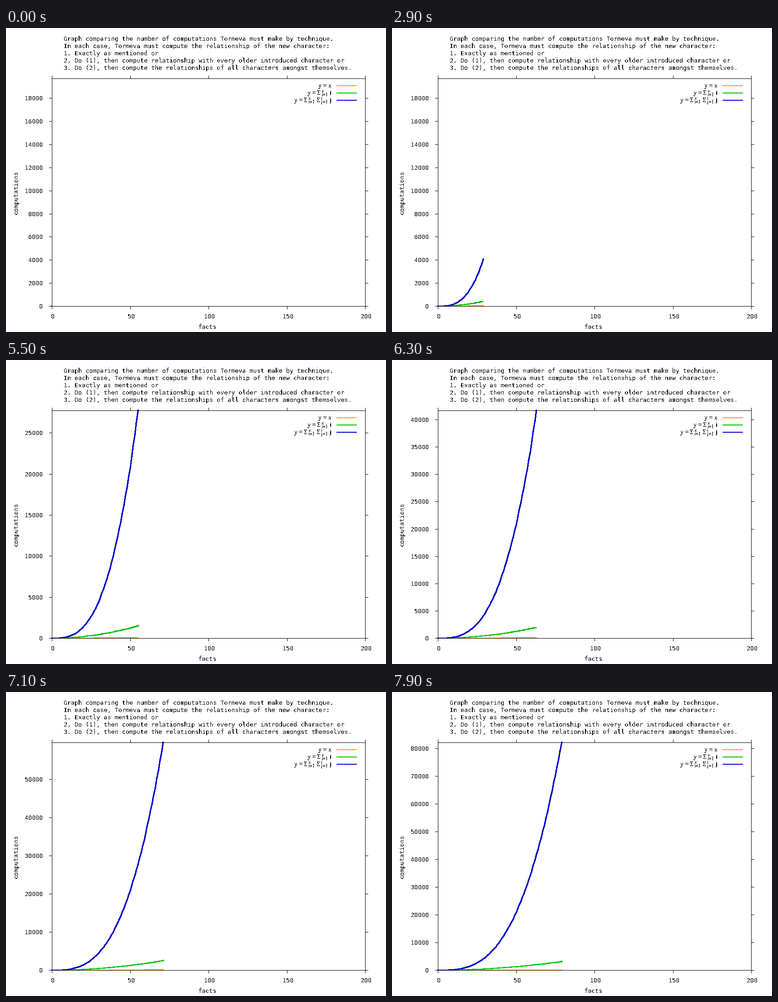
Write a matplotlib script that moves like this. It is 837x669 px and loops after 8000 ms.

```python
import numpy as np
import matplotlib.pyplot as plt
from matplotlib.animation import FuncAnimation

plt.rcParams["text.hinting"] = "native"
plt.rcParams["text.hinting_factor"] = 64

W, H, DPI = 837, 669, 96
LEFT, RIGHT, TOP, BOTTOM = 101, 791, 111, 612
X_MAX, TICK, CHAR = 200, 6, 8
STEPS, INTERVAL = 80, 100
COLORS = ["#ffa010", "#00c000", "#0000cd"]
MONO, SERIF = "DejaVu Sans Mono", "Liberation Serif"

HEADING = [
    "Graph comparing the number of computations Tormeva must make by technique.",
    "In each case, Tormeva must compute the relationship of the new character:",
    "1. Exactly as mentioned or",
    "2. Do (1), then compute relationship with every older introduced character or",
    "3. Do (2), then compute the relationships of all characters amongst themselves.",
]

# Integer axes coordinates are pixel edges, counted from the top left
fig = plt.figure(figsize=(W / DPI, H / DPI), dpi=DPI, facecolor="white")
ax = fig.add_axes([0, 0, 1, 1])
ax.set_xlim(0, W)
ax.set_ylim(H, 0)
ax.axis("off")


def text(x, y, s, size=10, font=MONO, ha="left", **kw):
    return ax.text(x, y, s, fontsize=size, family=font, ha=ha, va="baseline",
                   color="black", antialiased=False, **kw)


def line(xs, ys, color, width, z):
    return ax.plot(xs, ys, color=color, lw=width * 72 / DPI, zorder=z,
                   antialiased=False, snap=False,
                   solid_capstyle="projecting", solid_joinstyle="miter")[0]


def thin(xs, ys):
    """One-pixel line through the middle of the given pixels."""
    return line(np.add(xs, 0.5), np.add(ys, 0.5), "black", 1, 3)


def thick(xs, ys, color):
    """Two-pixel line covering each given pixel and its upper left neighbours."""
    return line(xs, ys, color, 2, 2)


def px_x(v):
    return np.floor(LEFT + np.asarray(v) * (RIGHT - LEFT) / X_MAX + 0.5)


def px_y(v, top):
    return BOTTOM - np.floor(np.asarray(v) * (BOTTOM - TOP) / top + 0.5)


def tick_step(top):
    """Round tick spacing that gives at most about ten labels."""
    power = 10 ** np.floor(np.log10(top))
    density = 20 * power / top
    return power * (0.2 if density > 10 else 0.5 if density > 4 else 1)


def segments(parts):
    """Join separate two-point lines into one path with gaps."""
    pts = [p for a, b in parts for p in (a, b, (np.nan, np.nan))]
    return np.array(pts).T


# Fixed text
for i, row in enumerate(HEADING):
    text(127, 28 + 16 * i, row)
text(424, 662, "facts")
text(26, 362, "computations", ha="center", rotation=90, rotation_mode="anchor")

# Frame and horizontal axis
thin([LEFT, RIGHT, RIGHT, LEFT, LEFT], [TOP, TOP, BOTTOM, BOTTOM, TOP])
x_ticks = []
for v in range(0, X_MAX + 1, 50):
    x, s = px_x(v), str(v)
    x_ticks += [((x, TOP - TICK), (x, TOP)), ((x, BOTTOM), (x, BOTTOM + TICK))]
    text(x + 2 - CHAR * len(s) / 2, 639, s)
thin(*segments(x_ticks))

# Legend
BIG, SMALL = 10.5, 8.4


def sigma(x, base, upper, lower):
    text(x, base, "Σ", BIG, SERIF)
    text(x + 10, base - 5, upper, SMALL, SERIF)
    text(x + 10, base + 3, lower, SMALL, SERIF)


for i, color in enumerate(COLORS):
    y = 127 + 16 * i
    thick([729, 772], [y, y], color)
text(717, 131, "y = x", BIG, SERIF, "right")
text(664, 147, "y =", BIG, SERIF)
sigma(685, 147, "x", "i=1")
text(717, 147, "i", BIG, SERIF, "right")
text(635, 163, "y =", BIG, SERIF)
sigma(656, 163, "x", "i=1")
sigma(684, 163, "i", "j=1")
text(717, 163, "j", BIG, SERIF, "right")

# Moving parts
n = np.arange(STEPS)
series = [n, n * (n - 1) / 2, (n - 1) * n * (n + 1) / 6]
n_px = px_x(n)
MIN_TOP = 199 * 198 / 2
curves = [thick([], [], c) for c in COLORS]
y_marks = thin([], [])
y_labels = [text(0, 0, "") for _ in range(11)]


def update(k):
    top = max(MIN_TOP, series[2][k])
    # a tiny first segment keeps a dot visible at the start
    xs = np.r_[LEFT - 0.01, n_px[:k + 1]]
    for curve, vals in zip(curves, series):
        curve.set_data(xs, px_y(np.r_[vals[0], vals[:k + 1]], top))
    marks = []
    values = np.arange(0, top + 1e-6, tick_step(top))
    for i, label in enumerate(y_labels):
        if i >= len(values):
            label.set_text("")
            continue
        y, s = px_y(values[i], top), f"{values[i]:.0f}"
        marks += [((LEFT - TICK, y), (LEFT, y)), ((RIGHT, y), (RIGHT + TICK, y))]
        label.set_text(s)
        label.set_position((81 - CHAR * len(s), y + 5))
    y_marks.set_data(*(segments(marks) + 0.5))
    return [*curves, y_marks, *y_labels]


anim = FuncAnimation(fig, update, frames=STEPS, interval=INTERVAL,
                     repeat=True, repeat_delay=0, blit=False)
plt.show()
```
